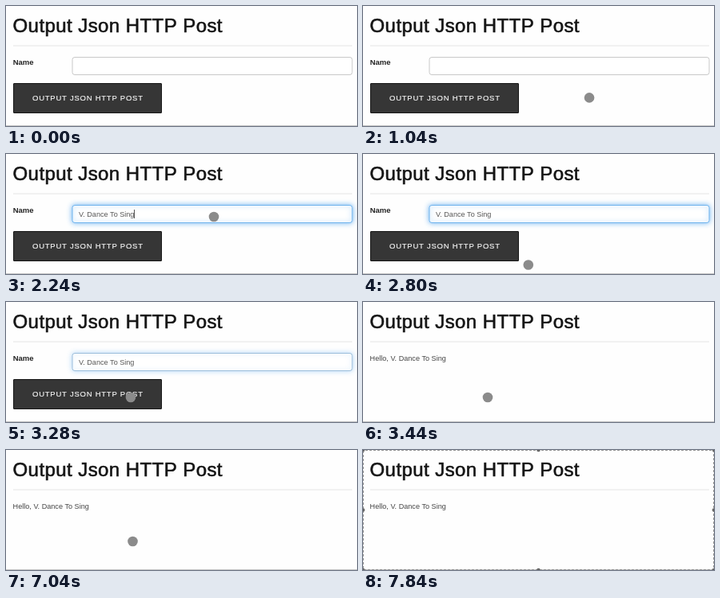
An HTML page with a canvas that plays this animation: 439 px wide and 151 px high, repeating every 9.52 s.

```html
<!DOCTYPE html>
<html lang="en">
<head>
<meta charset="utf-8">
<title>Output Json HTTP Post</title>
<style>
  html, body { margin: 0; width: 100%; height: 100%; overflow: hidden; background: #fefefe; }
  canvas { display: block; width: 439px; height: 151px; }
</style>
</head>
<body>
<canvas id="stage" width="439" height="151"></canvas>
<script>
const W = 439, H = 151, LOOP = 9520, STEP = 80;
const FONT = '"Liberation Sans", Arial, sans-serif';
const NAME = 'V. Dance To Sing';
const FOCUS = 1760, BLUR = 3200, SUBMIT = 3440;
const canvas = document.getElementById('stage');
const ctx = canvas.getContext('2d');
const scale = window.devicePixelRatio || 1;
canvas.width = W * scale;
canvas.height = H * scale;

// Pointer stops: time, x, y
const path = [
  [800, 298, 139], [1360, 260, 79], [2240, 260, 79], [2760, 208, 140],
  [3200, 156, 120], [4960, 156, 120], [5360, 147.5, 112.5],
  [5680, 147.5, 112.5], [5840, 147.5, 114], [6000, 147.5, 114], [6320, 158.5, 115]
];

const clamp = v => Math.max(0, Math.min(1, v));
const ramp = (t, from, to) => clamp((t - from) / (to - from));
const ease = p => p * p * (3 - 2 * p);

function pointerAt(t) {
  let [, x, y] = path[0];
  for (let i = 1; i < path.length; i++) {
    const [t0, x0, y0] = path[i - 1];
    const [t1, x1, y1] = path[i];
    if (t < t0) break;
    const p = ease(ramp(t, t0, t1));
    x = x0 + (x1 - x0) * p;
    y = y0 + (y1 - y0) * p;
  }
  return [x, y];
}

function text(str, x, y, size, color, { weight = 400, spacing = 0, bolder = 0 } = {}) {
  ctx.font = `${weight} ${size}px ${FONT}`;
  ctx.letterSpacing = spacing + 'px';
  ctx.fillStyle = color;
  ctx.fillText(str, x, y);
  if (bolder) {
    ctx.strokeStyle = color;
    ctx.lineWidth = bolder;
    ctx.strokeText(str, x, y);
  }
  return ctx.measureText(str).width;
}

function rect(x, y, w, h, color) {
  ctx.fillStyle = color;
  ctx.fillRect(x, y, w, h);
}

function box(x, y, w, h, r, fill, line) {
  ctx.beginPath();
  ctx.roundRect(x, y, w, h, r);
  ctx.fillStyle = fill;
  ctx.fill();
  ctx.strokeStyle = line;
  ctx.lineWidth = 1;
  ctx.stroke();
}

function drawField(t) {
  const focus = ramp(t, FOCUS, FOCUS + 160) - ramp(t, BLUR, BLUR + 160);
  ctx.save();
  if (focus) {
    ctx.shadowColor = `rgba(90, 170, 240, ${0.85 * focus})`;
    ctx.shadowBlur = 6 * scale;
  }
  const mix = (a, b) => Math.round(a + (b - a) * focus);
  box(83, 64.5, 350, 22, 3, '#fff', `rgb(${mix(200, 112)}, ${mix(200, 180)}, ${mix(200, 238)})`);
  ctx.restore();
  if (t < FOCUS) return;
  const typed = NAME.slice(0, Math.round(NAME.length * ramp(t, FOCUS, 2240)));
  const width = text(typed, 91, 78.5, 9.1, '#555');
  if (t < 2640) rect(Math.round(91 + width), 70, 1, 11, typed ? '#555' : '#999');
}

function drawForm(t) {
  text('Name', 8.7, 74, 9.5, '#222', { weight: 700 });
  drawField(t);
  box(9.5, 97.5, 185, 37, 0.5, '#363636', '#161616');
  text('OUTPUT JSON HTTP POST', 33, 119.3, 9.5, '#f2f2f2', { spacing: 0.75, bolder: 0.2 });
}

function drawPointer(t) {
  if (t < 640 || t >= 7840) return;
  const [x, y] = pointerAt(t);
  ctx.globalAlpha = t >= 7760 ? 0.5 : 1;
  ctx.beginPath();
  ctx.arc(x, y, t < 880 ? 4.8 : 6.3, 0, Math.PI * 2);
  ctx.fillStyle = '#8b8b8b';
  ctx.fill();
  ctx.globalAlpha = 1;
}

function drawSelection(t) {
  if (t < 7360) return;
  ctx.globalAlpha = t < 7440 ? 0.5 : 1;
  ctx.setLineDash([3, 2]);
  ctx.lineDashOffset = 2.5;
  ctx.strokeStyle = '#999';
  ctx.lineWidth = 1;
  ctx.strokeRect(0.5, 0.5, W - 1, H - 1);
  ctx.setLineDash([]);
  ctx.fillStyle = '#666';
  for (const x of [0, W / 2, W]) {
    for (const y of [0, H / 2, H]) {
      if (x === W / 2 && y === H / 2) continue;
      ctx.beginPath();
      ctx.arc(x, y, 2.3, 0, Math.PI * 2);
      ctx.fill();
    }
  }
  ctx.globalAlpha = 1;
}

function draw(t) {
  ctx.setTransform(scale, 0, 0, scale, 0, 0);
  rect(0, 0, W, H, '#fefefe');
  text('Output Json HTTP Post', 8.5, 33, 24, '#151515', { spacing: 0.43, bolder: 0.6 });
  rect(9, 49.5, 424, 1, '#e6e6e6');
  rect(0, 150, W, 1, '#c8c8c8');
  if (t < SUBMIT) drawForm(t);
  else text('Hello, ' + NAME, 8.6, 74, 9.1, '#444');
  drawPointer(t);
  drawSelection(t);
}

const start = performance.now();
function tick() {
  const t = (performance.now() - start) % LOOP;
  draw(Math.floor(t / STEP) * STEP);
  requestAnimationFrame(tick);
}
tick();
</script>
</body>
</html>
```
